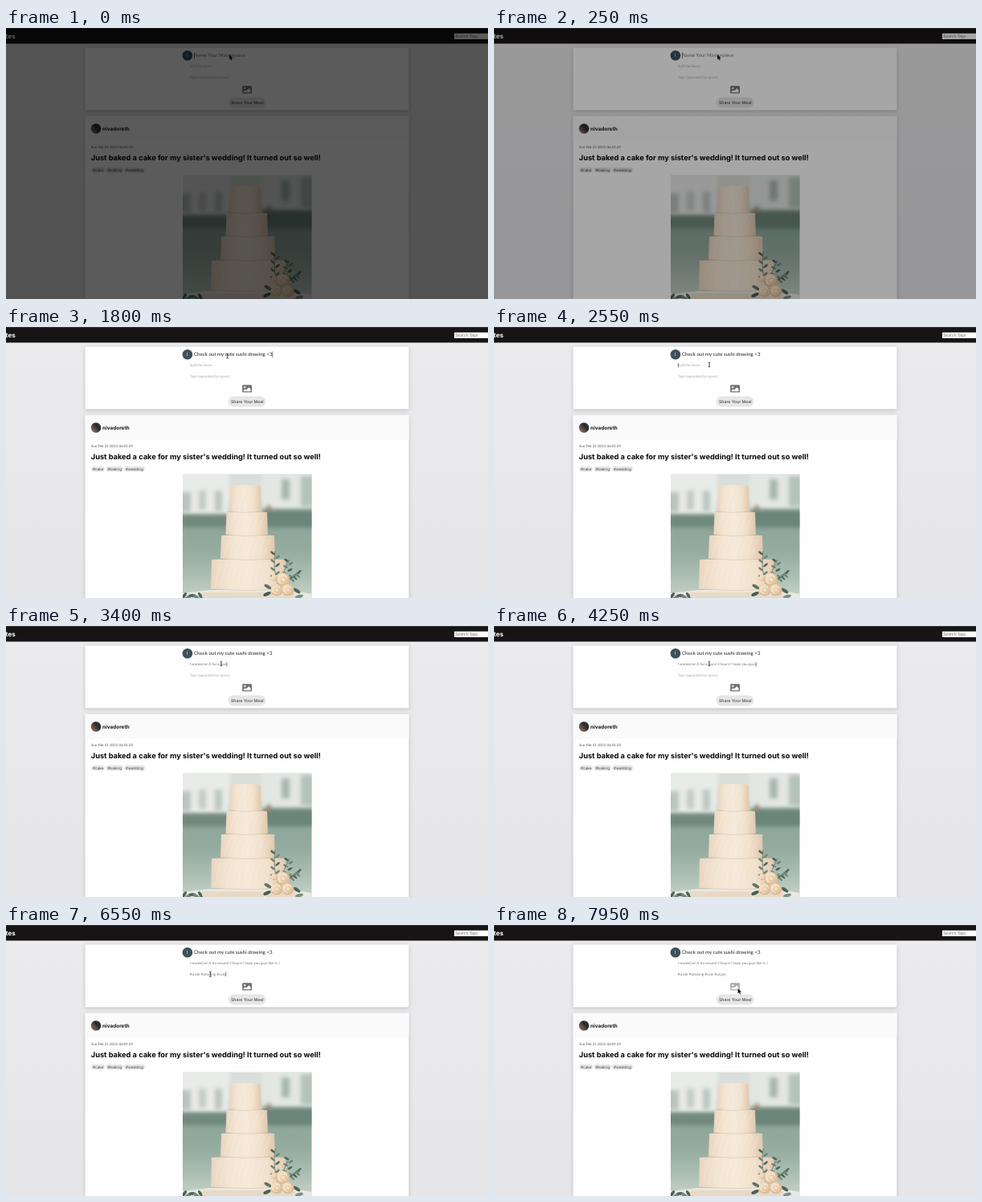
These frames come from a looping animation (600 by 338 pixels, 8 s). An HTML page with a canvas:

```html
<!DOCTYPE html>
<html lang="en">
<head>
<meta charset="utf-8">
<title>Sharing a meal</title>
<style>
html, body { margin: 0; width: 100%; height: 100%; overflow: hidden; background: #e8e7e9; }
canvas { display: block; width: 600px; height: 338px; }
</style>
</head>
<body>
<canvas id="stage"></canvas>
<script>
const W = 600, H = 338, LOOP = 8000, STEP = 50;
const SANS = "Inter, sans-serif", LIGHT = "Lato, sans-serif";
const ratio = window.devicePixelRatio || 1;

function setup(canvas) {
  canvas.width = W * ratio;
  canvas.height = H * ratio;
  const c = canvas.getContext("2d");
  c.scale(ratio, ratio);
  c.textRendering = "geometricPrecision";
  return c;
}

const ctx = setup(document.getElementById("stage"));
const page = document.createElement("canvas");

function box(c, x, y, w, h, fill, r = 0) {
  c.fillStyle = fill;
  c.beginPath();
  c.roundRect(x, y, w, h, r);
  c.fill();
}

function disc(c, x, y, r, fill, ry = r, turn = 0) {
  c.fillStyle = fill;
  c.beginPath();
  c.ellipse(x, y, r, ry, turn, 0, Math.PI * 2);
  c.fill();
}

function poly(c, points, fill) {
  c.fillStyle = fill;
  c.beginPath();
  points.forEach(([x, y]) => c.lineTo(x, y));
  c.closePath();
  c.fill();
}

function text(c, str, x, y, font, fill) {
  c.font = font;
  c.fillStyle = fill;
  c.fillText(str, x, y);
}

function gradient(c, x0, y0, x1, y1, ...colors) {
  const g = c.createLinearGradient(x0, y0, x1, y1);
  colors.forEach((col, i) => g.addColorStop(i / (colors.length - 1), col));
  return g;
}

function card(c, y, h) {
  c.save();
  c.shadowColor = "rgba(0,0,0,.2)";
  c.shadowBlur = 4 * ratio;
  c.shadowOffsetY = ratio;
  box(c, 98.5, y, 403, h, "#fefefe", 1);
  c.restore();
}

function garden(c) {
  box(c, 220, 183, 161, 155, gradient(c, 0, 183, 0, 338,
    "#d9deda", "#dbe0dc", "#8ea79b", "#93aa9f", "#a9bcb0", "#c6d1c8"));
  c.filter = `blur(${2.5 * ratio}px)`;
  // pale house and trees behind the lawn
  box(c, 214, 178, 64, 56, "#e9ebe9");
  box(c, 214, 206, 16, 25, "#b9c4be");
  box(c, 240, 204, 9, 24, "#c3cbc7");
  box(c, 260, 204, 9, 26, "#bcc6c1");
  box(c, 318, 178, 70, 48, "#e3e7e4");
  box(c, 343, 190, 10, 25, "#a9b5b0");
  box(c, 367, 186, 20, 38, "#b4c2ba");
  box(c, 214, 234, 64, 16, "#71897e");
  box(c, 320, 228, 68, 22, "#6b857a");
  disc(c, 327, 227, 2.5, "#9b8168", 5);
  c.filter = "none";
}

function tier(c, x0, x1, y0, y1) {
  const fill = gradient(c, x0, 0, x1, 0, "#e9d6c0", "#f4e5d3", "#f6e9d9", "#f1e0cc", "#dfc8ae");
  c.fillStyle = fill;
  c.beginPath();
  c.moveTo(x0 + 1, y0);
  c.quadraticCurveTo((x0 + x1) / 2, y0 - 2, x1 - 1, y0);
  c.lineTo(x1, y1);
  c.quadraticCurveTo((x0 + x1) / 2, y1 + 3, x0, y1);
  c.closePath();
  c.fill();
  c.strokeStyle = "rgba(174,141,108,.4)";
  c.lineWidth = .6;
  c.beginPath();
  c.moveTo(x0, y1);
  c.quadraticCurveTo((x0 + x1) / 2, y1 + 3, x1, y1);
  c.stroke();
  // faint diagonal icing
  c.strokeStyle = "rgba(255,250,240,.4)";
  for (let x = x0 + 5; x < x1 - 9; x += 7) {
    c.beginPath();
    c.moveTo(x, y1 - 3);
    c.quadraticCurveTo(x + 2, (y0 + y1) / 2, x + 8, y0 + 4);
    c.stroke();
  }
}

function leaf(c, x, y, r, turn, fill) {
  disc(c, x, y, r, fill, r * .42, turn);
}

function rose(c, x, y, r) {
  disc(c, x, y, r, "#dcbd98");
  disc(c, x - r * .15, y - r * .15, r * .8, "#f2dfc4");
  disc(c, x + r * .1, y + r * .1, r * .5, "#e6c8a4");
  disc(c, x, y, r * .26, "#f4e2ca");
}

function photo(c) {
  c.save();
  c.beginPath();
  c.rect(220, 183.5, 160.5, 155);
  c.clip();
  garden(c);
  poly(c, [[220, 332], [254, 328], [350, 328], [381, 333], [381, 338], [220, 338]], "#e9e8e1");
  for (let i = 0; i < 6; i++) {
    leaf(c, 222 + i * 5, 335 + (i % 2) * 2, 4.5, i * .5 - 1, i % 2 ? "#72887a" : "#4c6659");
  }
  box(c, 244, 331, 116, 7, "#e8d9c6", 2);
  tier(c, 255, 349, 290, 327);
  tier(c, 267, 335, 260, 289);
  tier(c, 273.5, 326, 231, 259);
  tier(c, 278, 318, 198, 230);

  c.strokeStyle = "#5b7367";
  c.lineWidth = .8;
  c.beginPath();
  c.moveTo(338, 320);
  c.quadraticCurveTo(332, 300, 335, 279);
  c.moveTo(344, 312);
  c.quadraticCurveTo(347, 299, 353, 290);
  c.moveTo(351, 316);
  c.lineTo(366, 307);
  c.stroke();
  for (let i = 0; i < 7; i++) {
    const side = i % 2 ? 1 : -1, green = i % 3 ? "#6d8576" : "#4b6558";
    leaf(c, 335 + side * 3, 282 + i * 5, 3.4, side * -.7, green);
    leaf(c, 349 + side * 3 + (6 - i) * .5, 291 + i * 4, 3.2, side * -.5, green);
    leaf(c, 355 + i * 1.7, 315 - i * 1.3 + side * 2, 3, side * .7, green);
  }
  leaf(c, 326, 324, 5, .5, "#5b7367");
  leaf(c, 325, 333, 5, -.4, "#465f52");
  leaf(c, 362, 329, 5, .6, "#4b6558");
  leaf(c, 365, 336, 5, -.2, "#7d9183");
  rose(c, 345, 315, 8.5);
  rose(c, 337, 328, 7.5);
  rose(c, 351, 328, 7.5);
  rose(c, 334, 313, 4);
  c.restore();
}

function buildPage(c) {
  box(c, 0, 0, W, H, gradient(c, 0, 19, 0, H, "#ebeaec", "#e6e5e8"));
  box(c, 0, 0, W, 19.4, "#171415");
  box(c, 0, 0, W, 1, "#343233");
  text(c, "tes", -.4, 13.3, `700 8px ${SANS}`, "#fff");
  box(c, 558, 6.8, 42, 7.2, "#fff");
  text(c, "Search Tags", 559.3, 12.4, `400 5.5px ${LIGHT}`, "#777");

  card(c, 24.5, 78);
  disc(c, 225.9, 34.2, 6.3, "#3c515b");
  text(c, "I", 225.1, 36.2, `400 5.6px ${SANS}`, "#fff");
  box(c, 276.7, 86.5, 46.8, 13, "#e6e6e6", 6.5);
  text(c, "Share Your Meal", 280, 94.9, `600 5.15px ${SANS}`, "#5a5a5a");

  card(c, 109.8, 240);
  box(c, 98.5, 110, 403, 30.5, "#fafafa", 1);
  disc(c, 112, 125.5, 6.3, gradient(c, 107, 130, 117, 121, "#95705f", "#5e4a45", "#262a2e", "#34414a"));
  text(c, "nivadoreth", 120, 127.7, `700 6.4px ${SANS}`, "#161616");
  text(c, "Sun Feb 21 2021 06:01:29", 106, 150, `400 4.45px ${LIGHT}`, "#555");
  text(c, "Just baked a cake for my sister's wedding! It turned out so well!",
    105.8, 165, `700 9.24px ${SANS}`, "#090909");
  [["#cake", 106, 17], ["#baking", 124.3, 21.8], ["#wedding", 147, 26]].forEach(([tag, x, w]) => {
    box(c, x, 173.7, w, 6.8, "#e7e7e7", 3.4);
    text(c, tag, x + 2, 178.8, `400 4.65px ${SANS}`, "#444");
  });
  photo(c);
}

const fields = [
  { str: "Check out my cute sushi drawing <3", hint: "Name Your Masterpiece",
    x: 234, y: 36.3, size: 6.15, ink: "#222", pale: "#777", focus: 0, start: 250, rate: 34, blur: 2300 },
  { str: "I worked on it for around 3 hours! I hope you guys like it :)", hint: "Spill the beans",
    x: 228.8, y: 49.2, size: 4.44, ink: "#777", pale: "#aaa", focus: 2300, start: 2580, rate: 33, blur: 5150 },
  { str: "#sushi #drawing #cute #origin", hint: "Tags (separated by space)",
    x: 228.8, y: 62.8, size: 4.5, ink: "#777", pale: "#aaa", focus: 5150, start: 5220, rate: 62, blur: LOOP }
];

function drawField(f, t) {
  const count = Math.max(0, Math.min(f.str.length, Math.floor((t - f.start) / f.rate)));
  const typed = f.str.slice(0, count);
  const font = `400 ${f.size}px ${LIGHT}`;
  text(ctx, typed || f.hint, f.x, f.y, font, typed ? f.ink : f.pale);
  if (t < f.focus || t >= f.blur) return;
  const idle = t - (f.start + f.str.length * f.rate);
  if (idle > 0 && Math.floor(idle / 500) % 2) return;
  const x = f.x + ctx.measureText(typed).width;
  box(ctx, x + .1, f.y - f.size * .93, .6, f.size * 1.2, "#333");
}

function drawIcon(hover) {
  const fill = hover ? "#aaa" : "#707070", gap = "#fefefe";
  box(ctx, 294.2, 72.2, 11.8, 9.4, fill, 1.2);
  disc(ctx, 297.3, 75.1, 1.2, gap);
  poly(ctx, [[295.8, 80.2], [295.8, 79], [297.7, 77.2], [299, 78.4], [302.2, 75.2], [304.5, 77.5], [304.5, 80.2]], gap);
}

// pointer stops: leave time, arrive time, x, y
const moves = [[0, 0, 278, 33], [1600, 2250, 268, 47], [4680, 5100, 254.3, 61.5], [7150, 7750, 303.5, 79]];

function pointerAt(t) {
  let [, , x, y] = moves[0];
  for (const [from, to, mx, my] of moves.slice(1)) {
    const p = Math.max(0, Math.min(1, (t - from) / (to - from)));
    const e = p * p * (3 - 2 * p);
    x += (mx - x) * e;
    y += (my - y) * e;
  }
  return [x, y];
}

function drawPointer(x, y, arrow) {
  ctx.save();
  ctx.translate(x, y);
  if (arrow) {
    const shape = [[0, 0], [0, 6.6], [1.5, 5.3], [2.5, 7.6], [3.7, 7], [2.7, 4.8], [4.8, 4.7]];
    poly(ctx, shape, "#000");
    ctx.strokeStyle = "rgba(255,255,255,.7)";
    ctx.lineWidth = .4;
    ctx.stroke();
  } else {
    box(ctx, -.4, -2.8, .8, 5.6, "#222");
    box(ctx, -1.3, -3.1, 2.6, .7, "#222");
    box(ctx, -1.3, 2.4, 2.6, .7, "#222");
  }
  ctx.restore();
}

function draw(t) {
  const [x, y] = pointerAt(t);
  ctx.drawImage(page, 0, 0, W, H);
  fields.forEach(f => drawField(f, t));
  drawIcon(t > 7000 && x > 294 && y > 72);
  drawPointer(x, y, t < 300 || y > 66);
  const shade = .64 * Math.max(0, 1 - t / 550);
  if (shade) box(ctx, 0, 0, W, H, `rgba(0,0,0,${shade})`);
}

buildPage(setup(page));
const begun = performance.now();

function tick() {
  const t = (performance.now() - begun) % LOOP;
  draw(Math.floor(t / STEP) * STEP);
  requestAnimationFrame(tick);
}
tick();
</script>
</body>
</html>
```
